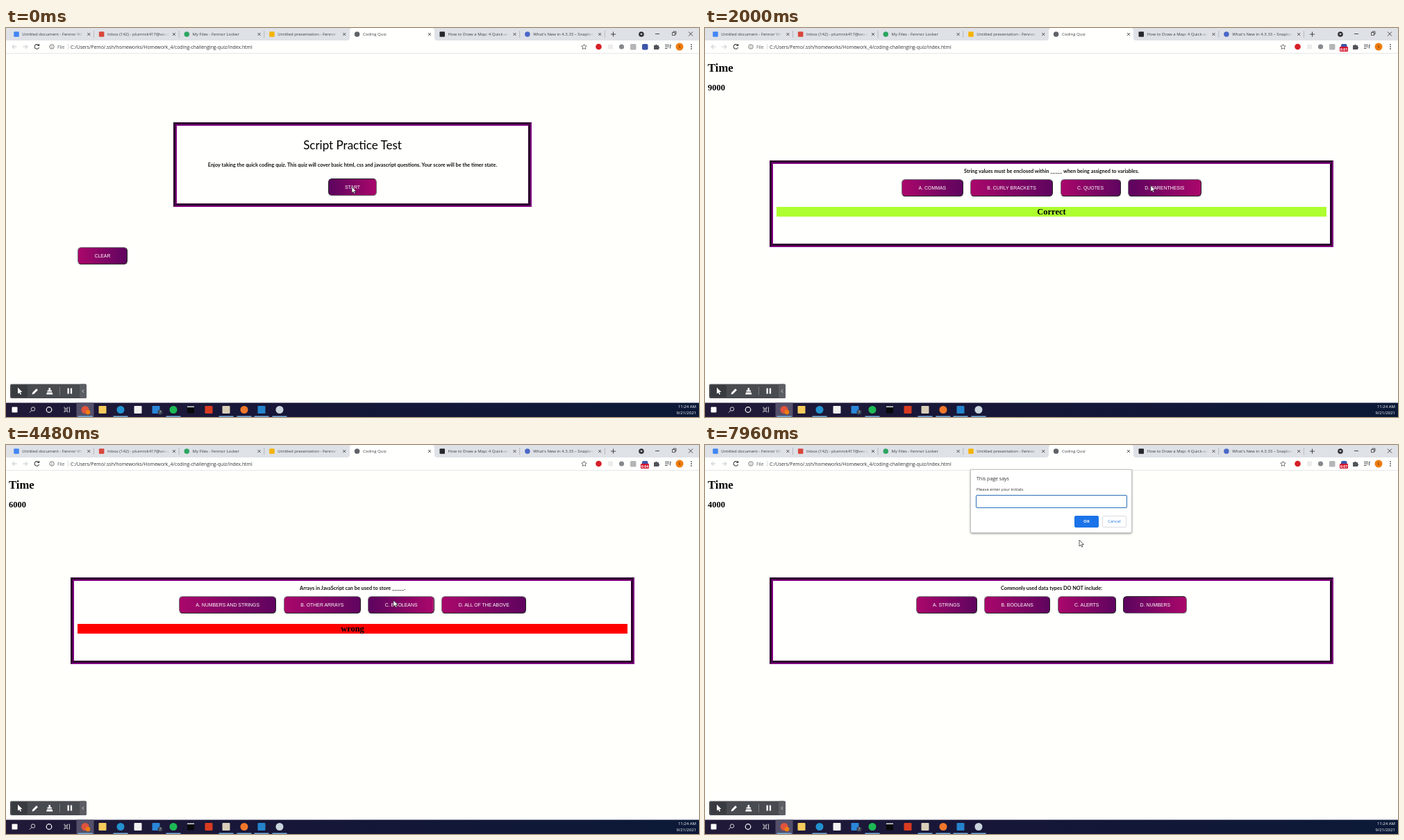
Recreate the animation shown at these times as an HTML page. Size 998x561 px, loop 8000 ms.

```html
<!DOCTYPE html>
<html lang="en">
<head>
<meta charset="utf-8">
<title>Coding Quiz</title>
<style>
  html, body { margin: 0; width: 100%; height: 100%; overflow: hidden; background: #fffffc; }
  #stage { position: relative; width: 998px; height: 561px; overflow: hidden; }
  #stage > *, .card, .card > * { position: absolute; }
  svg, #scene { left: 0; top: 0; width: 998px; height: 561px; }
  svg text, #prompt { font-family: "Open Sans", "Noto Sans", sans-serif; }
  .serif { left: 4px; font: bold 12.48px "Liberation Serif", serif; line-height: 16px; }
  .card { box-sizing: border-box; border: 5px groove purple; background: #fffffe; text-align: center; }
  .card > * { left: 0; right: 0; }
  .intro { left: 241px; top: 136px; width: 516px; height: 122px; }
  .quiz { left: 93px; top: 191px; width: 812px; height: 125px; }
  .title { top: 18px; font: 17px/20px Lato, sans-serif; }
  .line { font: bold 7.35px/10px Lato, sans-serif; color: #111; white-space: nowrap; }
  .row { display: flex; justify-content: center; gap: 10.4px; }
  .btn {
    box-sizing: border-box; height: 25px; padding: 0 23.4px; border: 1px outset #767676; border-radius: 5.2px;
    font: 6.93px/23px "Liberation Sans", sans-serif; color: #fff; white-space: nowrap;
    background: linear-gradient(to right, #aa076b 0%, #5d045f 51%, #aa076b 100%) 0 0 / 200% 100%;
  }
  .clear { position: absolute; left: 103px; top: 316px; }
  .pressed { border-style: inset; }
  .card > .verdict { left: 5px; right: 5px; top: 62px; height: 14px; font: bold 12.48px/14px "Liberation Serif", serif; }
  #prompt { left: 382px; top: 35px; width: 233px; height: 92px; background: #fff; border: 1px solid #c4c4c6;
    box-sizing: border-box; box-shadow: 0 1px 3px #0006; border-radius: 0 0 3px 3px; color: #333; font-size: 6px; }
  #prompt > * { position: absolute; box-sizing: border-box; white-space: nowrap; }
  #prompt b { top: 66px; width: 35px; height: 17px; border-radius: 2px; text-align: center;
    line-height: 15px; border: 1px solid #dadce0; color: #1a73e8; font-weight: 500; }
</style>
</head>
<body>
<div id="stage">
  <svg id="desktop">
    <defs>
      <linearGradient id="bar"><stop stop-color="#211a38"/><stop offset=".4" stop-color="#171638"/><stop offset="1" stop-color="#0b1937"/></linearGradient>
      <linearGradient id="fade"><stop stop-color="#dee1e6" stop-opacity="0"/><stop offset="1" stop-color="#dee1e6"/></linearGradient>
    </defs>
  </svg>
  <div class="serif" id="timeLabel" style="top:47px;font-size:16.64px;line-height:22px">Time</div>
  <div class="serif" id="timer" style="top:78px"></div>
  <div id="scene"></div>
  <div id="prompt">
    <span style="left:8px;top:8px;font-size:7px">This page says</span>
    <span style="left:8px;top:24px;font-size:5.9px">Please enter your initials.</span>
    <span style="left:7px;top:36px;width:218px;height:19px;border:1.5px solid #2b6fb8;border-radius:2px"></span>
    <b style="left:149px;background:#1a73e8;border-color:#1a73e8;color:#fff;font-weight:700">OK</b>
    <b style="left:189px">Cancel</b>
  </div>
  <svg>
    <g id="badge">
      <rect x="914" y="27" width="12" height="7" rx="1" fill="#d3122c"/>
      <text id="clock" x="920" y="32.6" font-size="5.2" font-weight="700" fill="#fff" text-anchor="middle"></text>
    </g>
    <path id="cursor" d="M0 0V9L2.1 7.1 3.6 10.2 5 9.5 3.6 6.5H6.4Z" fill="#fff" stroke="#222" stroke-width=".7"/>
  </svg>
</div>
<script>
const $ = id => document.getElementById(id);

// ---- static desktop ----
const rect = (x, y, w, h, fill, rx = 0) => `<rect x="${x}" y="${y}" width="${w}" height="${h}" rx="${rx}" fill="${fill}"/>`;
const dot = (x, y, r, fill) => `<circle cx="${x}" cy="${y}" r="${r}" fill="${fill}"/>`;
const line = (d, color = '#555', width = 1) => `<path d="${d}" fill="none" stroke="${color}" stroke-width="${width}"/>`;
const label = (x, y, size, text, fill = '#3c4043', anchor = 'start') =>
  `<text x="${x}" y="${y}" font-size="${size}" fill="${fill}" text-anchor="${anchor}">${text}</text>`;
const mark = (x, y, size, fill, round) =>
  round ? dot(x, y, size / 2, fill) : rect(x - size / 2, y - size / 2, size, size, fill, 1);

function browser() {
  const tabs = [
    ['Untitled document - Fennor Wr', '#4285f4'],
    ['Inbox (142) - plumrok417@vexal', '#d9463b'],
    ['My Files - Fennor Locker', '#2da561', true],
    ['Untitled presentation - Fennor', '#f4b400'],
    ['Coding Quiz', '#5f6368', true],
    ['How to Draw a Map: 4 Quick-an', '#24262b'],
    ["What's New in 4.3.33 – Snaploo", '#4a67c8', true],
  ];
  let out = rect(0, 0, 998, 18, '#dee1e6') + rect(0, 18, 998, 18, '#fffffe') + rect(0, 36, 998, .7, '#dcdde0')
    + '<path d="M491 18q4 0 4-4V4q0-4 4-4h114q4 0 4 4v10q0 4 4 4z" fill="#fffffe"/>';
  tabs.forEach(([name, color, round], i) => {
    const x = 15 + i * 122.65, active = i === 4;
    out += mark(x, 9, 7.5, color, round) + label(x + 8.3, 11.2, 6, name);
    if (!active) out += rect(x + 84, 2, 12, 14, 'url(#fade)') + rect(x + 96, 2, 4, 14, '#dee1e6');
    out += line(`M${x + 102.3} 7l4 4m0-4l-4 4`, '#444', .9);
    if (i !== 3 && !active) out += line(`M${x + 111.5} 4v10`, '#9a9da2', .6);
  });
  out += line('M871 9h7m-3.5-3.5v7', '#444')
    + dot(915, 9, 3.8, '#303236') + '<path d="M913.2 8h3.6l-1.8 2.3z" fill="#fff"/>'
    + line('M935 8.5h6', '#222', .8) + line('M959.5 6.5h4v4h-4zM961 6.5v-1.5h4v4h-1.5', '#222', .7)
    + line('M983 5.5l6 6m0-6l-6 6', '#222', .8)
    + line('M15.5 27H9m3-3l-3 3 3 3M24.5 27H31m-3-3l3 3-3 3', '#c2c4c7')
    + line('M47 24.8a3.3 3.3 0 1 0 .6 3.1M47.7 23v2.5h-2.5', '#444', 1.1)
    + '<circle cx="66" cy="27" r="3.2" fill="none" stroke="#555" stroke-width=".8"/>' + line('M66 26.5v2.2M66 24.8v.9', '#555', .8)
    + label(74, 29.5, 6.6, 'File', '#5f6368') + line('M89.5 23v8', '#c8cacd', .7)
    + label(93, 29.5, 6.85, 'C:/Users/Pemo/.ssh/homeworks/Homework_4/coding-challenging-quiz/index.html', '#303236')
    + '<path d="M832.5 23.4l1.1 2.4 2.7.3-2 1.8.6 2.6-2.4-1.3-2.4 1.3.6-2.6-2-1.8 2.7-.3z" fill="none" stroke="#555" stroke-width=".8"/>'
    + dot(853.5, 27, 4.3, '#d61f27') + rect(867, 23.5, 7, 7, '#ececec', 1)
    + dot(886.5, 27, 3.6, '#85898c') + rect(899, 23, 8.5, 8.5, '#b4b5b7', 1.5)
    + rect(916, 23, 8.5, 8.5, '#3d55a8', 2)
    + '<path d="M933 25h2.2a1.2 1.2 0 1 1 2.4 0H940v2.2a1.2 1.2 0 1 1 0 2.4V31h-7z" fill="#505357"/>'
    + line('M949 24.5h6M949 27h6M949 29.5h3.5M956.5 29.5v-5h1.5', '#505357')
    + dot(970, 27, 5.5, '#ef7d10') + label(970, 29, 5.5, 'S', '#5a2a00', 'middle')
    + [24, 27, 30].map(y => dot(987, y, .9, '#505357')).join('');
  return out;
}

function taskbar() {
  const icons = [[114, '#e0533d', 1], [139, '#f5cb5c'], [165, '#2391cf', 1], [190, '#f1f1f1'], [216, '#2a86d8'],
    [241, '#1db954', 1], [266, '#08090c'], [292, '#d83b20'], [317, '#d9cfb8'], [343, '#f0772b', 1], [368, '#2583cc'], [394, '#c9d3dc', 1]];
  return rect(0, 540.5, 998, 20.5, 'url(#bar)') + rect(101.5, 540.5, 25, 20.5, '#54506a')
    + mark(12.5, 550.5, 8, '#fff')
    + '<circle cx="39" cy="549.5" r="2.7" fill="none" stroke="#eee" stroke-width=".9"/>' + line('M37 551.5l-3 3', '#eee', .9)
    + '<circle cx="62" cy="550.5" r="3.8" fill="none" stroke="#fff" stroke-width="1.2"/>'
    + line('M84 546.5v2h5v-2M84 554.5v-2h5v2M84 550.5h5M91.5 546.5v8', '#ddd', .9)
    + icons.map(([x, color, round]) => mark(x, 550.5, x === 266 ? 10 : 11, color, round)).join('')
    + rect(261, 545.5, 10, 1.5, '#ddd') + dot(222, 554, 3.6, '#3b4150') + label(222, 556, 5, '7', '#fff', 'middle')
    + dot(118, 554, 3.3, '#ef7d10')
    + [114, 165, 241, 317, 343, 368, 394].map(x => rect(x - 10.5, 559.5, 21, 1.5, '#76b0df')).join('')
    + label(994, 548, 6, '11:24 AM', '#fff', 'end') + label(994, 557, 6, '9/21/2021', '#fff', 'end');
}

function recorder() {
  return rect(6, 513.5, 110, 20.5, '#484b50', 2) + rect(8, 515, 23, 17.5, '#383b3f', 2) + rect(106, 513.5, 10, 20.5, '#5b5e63', 2)
    + '<path d="M17 518.5v9l2.2-1.8 1.4 3 1.5-.7-1.4-2.9h2.8z" fill="#fff"/>'
    + '<path d="M37.5 528.5l.7-2.8 5.6-5.6 2.1 2.1-5.6 5.6z" fill="#fff"/>'
    + '<path d="M61.5 519h2.5v3.5h2v2h-6.5v-2h2zM59 525.5h7.5l1 3h-9.5z" fill="#fff"/>'
    + line('M77.5 517.5v12', '#777b80') + rect(88.5, 519.5, 2.3, 8, '#fff') + rect(92.8, 519.5, 2.3, 8, '#fff')
    + line('M112 521.5l-2 2.2 2 2.2', '#ddd', .9);
}

$('desktop').innerHTML += browser() + taskbar() + recorder();

// ---- quiz scenes: hovers are [button, enter, leave] in ms ----
const LOOP = 8000, PROMPT_AT = 6800;
const scenes = [
  { start: 0, hovers: [[0, -900, 100]] },
  { start: 100, ask: 'Inside which HTML element do we put the JavaScript?',
    answers: ['<js>', '<javascript>', '<scripting>', '<script>'], hovers: [[3, 840, 1350]] },
  { start: 1350, ask: 'String values must be enclosed within _____ when being assigned to variables.', verdict: 'Correct',
    answers: ['commas', 'curly brackets', 'quotes', 'parenthesis'],
    hovers: [[3, 1380, 2550], [2, 2620, 2860], [1, 2920, 3600]] },
  { start: 3600, ask: 'Arrays in JavaScript can be used to store _____.', verdict: 'wrong',
    answers: ['numbers and strings', 'other arrays', 'booleans', 'all of the above'],
    hovers: [[1, 3630, 3900], [2, 3960, 5080], [3, 5150, 6000]] },
  { start: 6000, ask: 'Commonly used data types DO NOT include:',
    answers: ['strings', 'booleans', 'alerts', 'numbers'], hovers: [[3, 6040, LOOP]] },
];
const clicks = [100, 1350, 3600, 6000, PROMPT_AT];
const cursorPath = [[0, 498, 229], [250, 498, 229], [840, 619, 232], [1150, 640, 228], [2200, 642, 227], [3200, 482, 237],
  [3650, 481, 237], [4400, 558, 224], [4700, 558, 224], [5500, 632, 226], [6850, 632, 226], [7600, 539, 137], [LOOP, 539, 137]];

const escapeHtml = text => text.replace(/</g, '&lt;').replace(/>/g, '&gt;');
const button = (text, extra = '') => `<div class="btn ${extra}">${escapeHtml(text.toUpperCase())}</div>`;

function sceneHtml({ ask, answers, verdict }) {
  if (!ask) return `<div class="card intro"><div class="title">Script Practice Test</div>
    <div class="line" style="top:52px">Enjoy taking the quick coding quiz. This quiz will cover basic html, css and javascript questions. Your score will be the timer state.</div>
    <div class="row" style="top:75.5px">${button('Start')}</div></div>
    ${button('Clear', 'clear')}`;
  const bar = verdict ? `<div class="verdict" style="background:${verdict === 'Correct' ? '#adff2f' : '#f00'}">${verdict}</div>` : '';
  return `<div class="card quiz"><div class="line" style="top:6px">${ask}</div>
    <div class="row" style="top:21.5px">${answers.map((a, i) => button('ABCD'[i] + '. ' + a)).join('')}</div>${bar}</div>`;
}

const clamp = x => Math.min(1, Math.max(0, x));
const easeOut = x => 1 - (1 - clamp(x)) ** 2.2;
const smooth = x => x * x * (3 - 2 * x);

function cursorAt(t) {
  const i = cursorPath.findIndex(p => p[0] > t), [t0, x0, y0] = cursorPath[i - 1], [t1, x1, y1] = cursorPath[i];
  const k = smooth((t - t0) / (t1 - t0));
  return [x0 + (x1 - x0) * k, y0 + (y1 - y0) * k];
}

let shown = null;
function render(t) {
  const scene = scenes.filter(s => s.start <= t).pop();
  if (scene !== shown) {
    $('scene').innerHTML = sceneHtml(scene);
    shown = scene;
  }
  const pressing = t >= PROMPT_AT || clicks.some(c => t < c && t >= c - 120);
  document.querySelectorAll('.btn').forEach((el, i) => {
    let glow = 0, over = false;
    for (const [index, enter, leave] of scene.hovers) {
      if (index !== i || t < enter) continue;
      over = t < leave;
      glow = over ? easeOut((t - enter) / 500) : easeOut((leave - enter) / 500) * (1 - easeOut((t - leave) / 500));
    }
    el.style.backgroundPosition = `${glow * 100}% 0`;
    el.classList.toggle('pressed', over && pressing);
  });

  const playing = t >= 100;
  $('timeLabel').hidden = $('timer').hidden = !playing;
  const ticks = Math.floor((Math.min(t, PROMPT_AT) - 100) / 1000);
  $('timer').textContent = ticks < 1 ? 0 : 10000 - ticks * 1000;
  $('badge').style.display = t < 300 ? 'none' : '';
  $('clock').textContent = '0:0' + Math.max(0, Math.floor((t - 100) / 1000));
  $('prompt').hidden = t < PROMPT_AT;
  $('cursor').setAttribute('transform', `translate(${cursorAt(t)})`);
}

const origin = performance.now();
function frame() {
  render((performance.now() - origin) % LOOP);
  requestAnimationFrame(frame);
}
frame();
</script>
</body>
</html>
```
